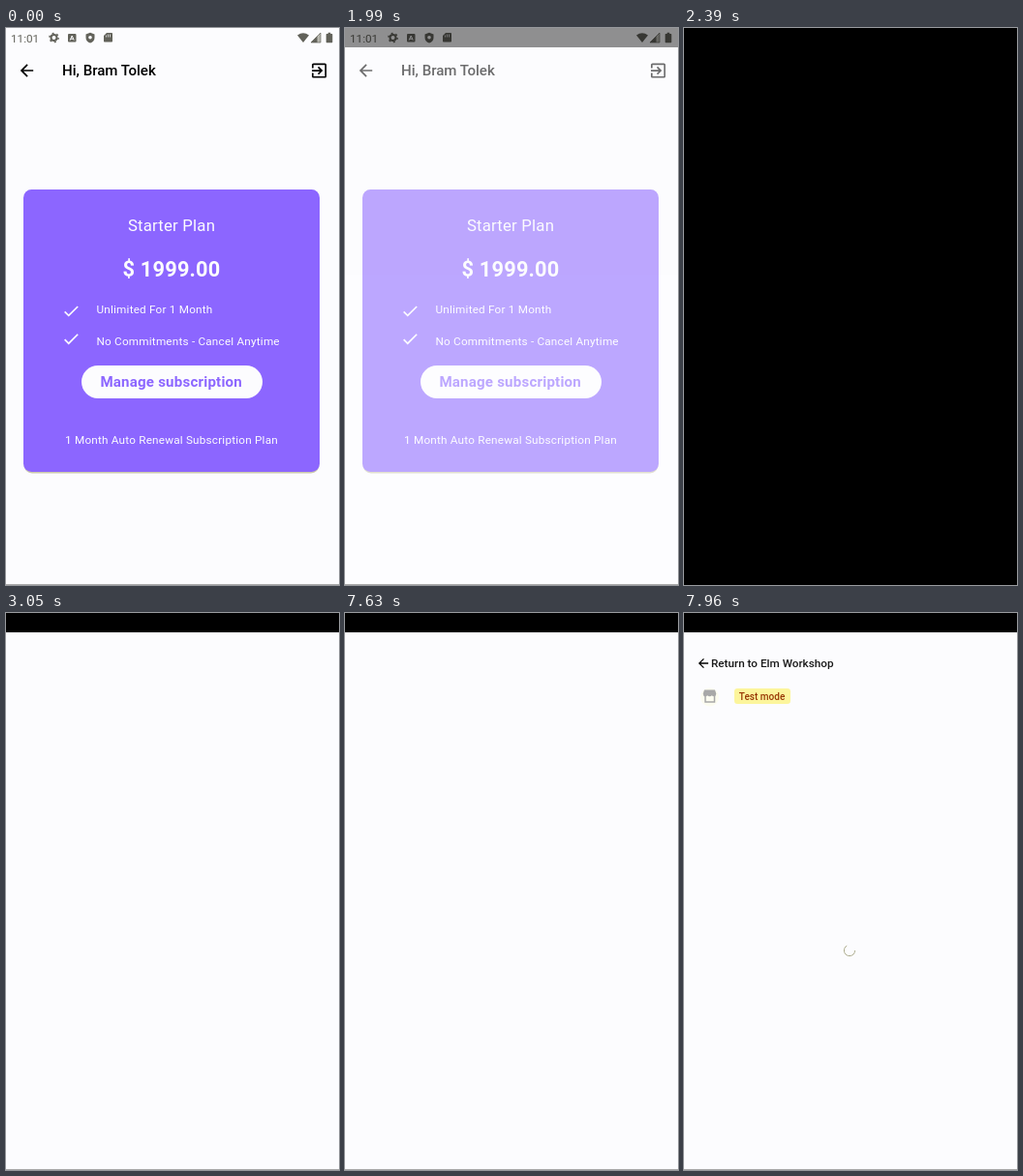
Animation of 344 by 576 pixels, one loop 8000 ms. Source, as an HTML page:

```html
<!DOCTYPE html>
<html lang="en">
<head>
<meta charset="utf-8">
<title>Subscription flow</title>
<style>
  html, body { margin: 0; width: 100%; height: 100%; overflow: hidden; background: #fcfcfe; }
  svg { display: block; width: 344px; height: 576px; font-family: Roboto, "Noto Sans", sans-serif; }
  .body { font-size: 11.72px; letter-spacing: .209px; }
  .medium { font-weight: 500; }
  .bold { font-weight: 700; letter-spacing: .209px; }
</style>
</head>
<body>
<svg viewBox="0 0 344 576" xmlns="http://www.w3.org/2000/svg">
  <defs>
    <path id="back" d="M8-1H-4.17L1.42-6.59 0-8-8 0 0 8 1.41 6.59-4.17 1H8z"/>
    <path id="check" d="M9 16.17 4.83 12l-1.42 1.41L9 19 21 7l-1.41-1.41z"/>
  </defs>
  <rect width="344" height="576" fill="#fcfcfe"/>

  <g id="plan">
    <g fill="#62625a">
      <text x="5" y="14.5" font-size="11.7">11:01</text>
      <g transform="translate(49.5 10)">
        <circle r="3" fill="none" stroke="#62625a" stroke-width="2"/>
        <circle r="4.6" fill="none" stroke="#62625a" stroke-width="1.5" stroke-dasharray="1.9 2.917"/>
      </g>
      <rect x="64" y="6" width="8.5" height="8.5" rx="1"/>
      <path d="M66.2 12.6 68.2 8l2 4.6M67 11.2h2.4" fill="none" stroke="#fcfcfe"/>
      <path d="M87 4.8 91.5 6.6V10c0 2.7-1.8 4.7-4.5 5.5-2.7-.8-4.5-2.8-4.5-5.5V6.6z"/>
      <circle cx="87" cy="9.8" r="1.8" fill="#fcfcfe"/>
      <path d="M104 5h5.2q.8 0 .8.8v8q0 .8-.8.8h-7.400q-.8 0-.8-.8V8z"/>
      <path d="M103.500 7.500v2M105.500 6.500v3M107.500 6.500v3" stroke="#fcfcfe" stroke-width=".7"/>
      <path d="M301 7.500q6-4.500 12 0L307 15z"/>
      <path d="M325 5v10h-10z" fill="#b8b8b0"/>
      <path d="M321.500 8.500V15H315z"/>
      <path d="M325 5v10h-10z" fill="none" stroke="#62625a" stroke-width=".7"/>
      <path d="M332.700 4.800h2.600V6h1.400q.6 0 .6.600v8q0 .6-.6.600h-5.400q-.6 0-.6-.6v-8q0-.6.6-.6h1.400z"/>
    </g>

    <use href="#back" transform="translate(21.5 44) scale(.837)"/>
    <text class="medium" x="58" y="49.3" font-size="15.07">Hi, Bram Tolek</text>
    <path transform="translate(313.5 34) scale(.837)" d="M10.09 15.59 11.5 17l5-5-5-5-1.41 1.41L12.67 11H3v2h9.67zM19 3H5c-1.11 0-2 .9-2 2v4h2V5h14v14H5v-4H3v4c0 1.1.89 2 2 2h14c1.1 0 2-.9 2-2V5c0-1.1-.9-2-2-2z"/>

    <rect x="18.5" y="169" width="305" height="291.5" rx="8.4" fill="#cbc9ad"/>
    <rect x="18" y="167" width="306" height="292" rx="8.4" fill="#8c66ff"/>
    <g fill="#fcfcfe">
      <text x="171" y="210.2" text-anchor="middle" font-size="16.74" letter-spacing=".209">Starter Plan</text>
      <text class="bold" x="171" y="257" text-anchor="middle" font-size="21.77">$ 1999.00</text>
      <use href="#check" transform="translate(57.2 282.7) scale(.837)"/>
      <use href="#check" transform="translate(57.2 311.5) scale(.837)"/>
      <text class="body" x="93.5" y="294.8">Unlimited For 1 Month</text>
      <text class="body" x="93.5" y="328.3">No Commitments - Cancel Anytime</text>
      <rect x="78" y="349" width="187" height="34" rx="17"/>
      <text class="body" x="171" y="429.5" text-anchor="middle">1 Month Auto Renewal Subscription Plan</text>
    </g>
    <text class="bold" x="170.7" y="371.3" text-anchor="middle" font-size="15.07" fill="#8c66ff">Manage subscription</text>
  </g>

  <g id="tab">
    <rect width="344" height="576" fill="#fcfcfe"/>
    <rect width="344" height="20"/>
    <g id="portal">
      <use href="#back" transform="translate(20 52) scale(.64)"/>
      <text class="medium" x="28" y="56.3" font-size="11.72" fill="#1a1a1a">Return to Elm Workshop</text>
      <circle cx="26.500" cy="87" r="9.500" fill="#fcfcf0"/>
      <path d="M21 79.500h11l1.300 4q-.2 2.700-2.200 2.700-1.500 0-2.300-1-.8 1-2.300 1-1.500 0-2.300-1-.8 1-2.300 1-2 0-2.200-2.700z" fill="#a8a8a8"/>
      <path d="M22 86v6h9.500v-6" fill="none" stroke="#a8a8a8" stroke-width="1.500"/>
      <rect x="52" y="78" width="58" height="16" rx="3.300" fill="#fcf59c"/>
      <text class="medium" x="56.800" y="89.500" font-size="10.040" fill="#983705">Test mode</text>
    </g>
    <path id="spinner" d="M0-5.600A5.600 5.600 0 1 1-4.850 2.800" fill="none" stroke="#aaa98a" stroke-width="1"/>
  </g>
  <path d="M0 575.5H344" stroke="#aaa"/>
  <rect id="black" width="344" height="576"/>
</svg>
<script>
  const LOOP = 8000, TURN = 1000;
  const [plan, tab, portal, spinner, black] =
    ["plan", "tab", "portal", "spinner", "black"].map(id => document.getElementById(id));
  const within = (t, from, to) => t >= from && t < to;
  const show = (el, on) => el.setAttribute("visibility", on ? "inherit" : "hidden");

  // Time of the latest of `count` even ticks, the last one falling on `to`.
  function tick(t, from, to, count) {
    const gap = (to - from) / (count - 1);
    const n = Math.floor((t - from) / gap + 1e-6);
    return from + Math.min(count - 1, Math.max(0, n)) * gap;
  }

  function spinTime(t) {
    if (t < 7360) return tick(t, 6500, 7230, 11);
    if (t < 7820) return tick(t, 7360, 7430, 2);
    return tick(t, 7820, 7960, 2);
  }

  function render(t) {
    const opened = t >= 1860;
    const fade = opened ? (tick(t, 1860, 2250, 7) - 1860 + 65) / 455 : 0;
    const onPortal = t >= 7820;
    show(plan, t < 2250);
    show(tab, opened);
    tab.setAttribute("opacity", fade);
    show(black, within(t, 2390, 3050) || within(t, 7690, 7760));
    show(portal, onPortal);
    show(spinner, within(t, 6500, 7630) || onPortal);

    const angle = onPortal
      ? 90 + (spinTime(t) - 7960) * 360 / TURN
      : (spinTime(t) - 6500) * 360 / TURN;
    spinner.setAttribute("transform", `translate(171 ${onPortal ? 349 : 298}) rotate(${angle})`);
  }

  const start = performance.now();
  function frame() {
    render((performance.now() - start) % LOOP);
    requestAnimationFrame(frame);
  }
  frame();
</script>
</body>
</html>
```
